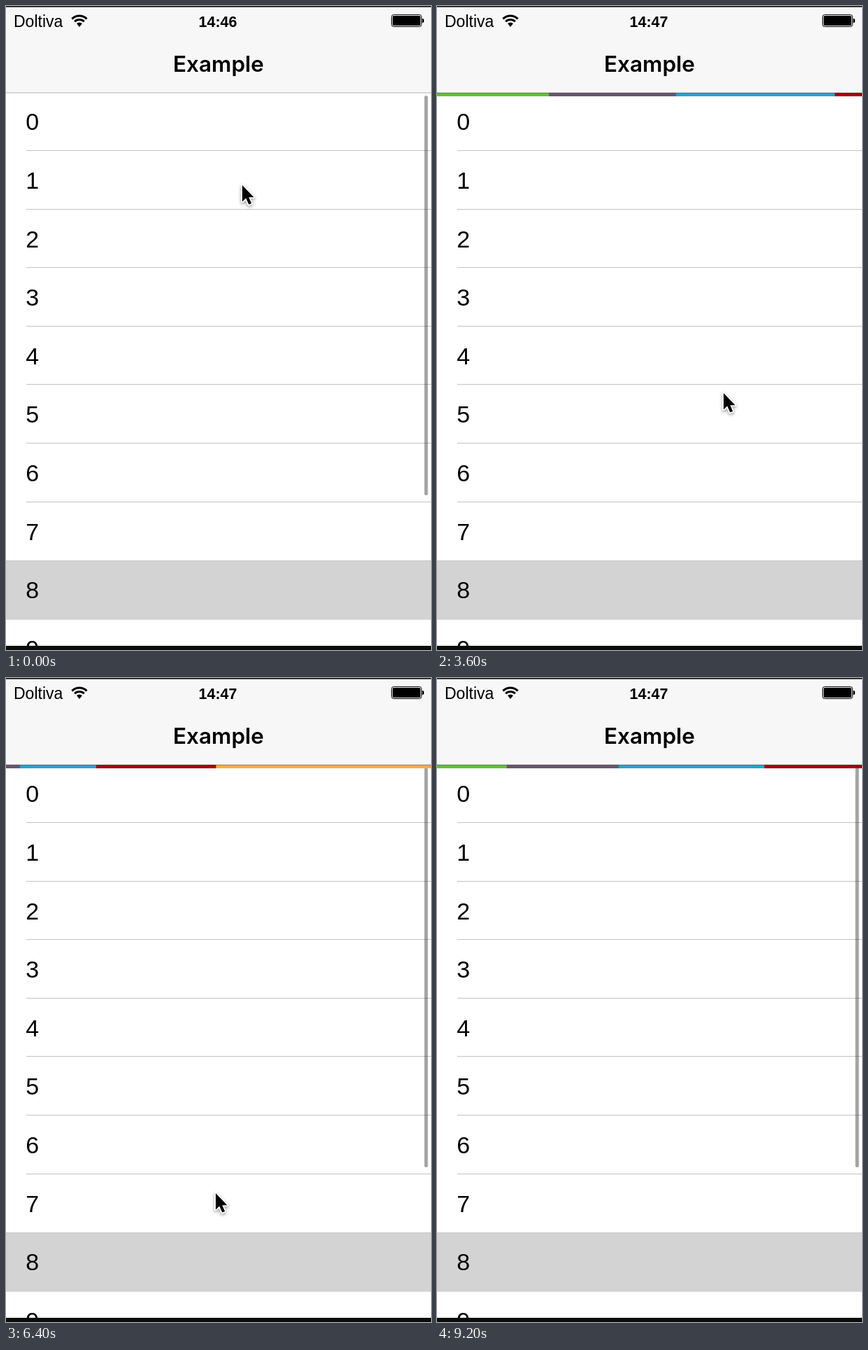
These frames come from a looping animation (608 px wide and 920 px high, 9300 ms). An HTML page with a canvas:

```html
<!DOCTYPE html>
<html lang="en">
<head>
<meta charset="utf-8">
<title>Pull to refresh</title>
<style>
  html, body { margin: 0; width: 100%; height: 100%; overflow: hidden; background: #fff; }
  canvas { display: block; width: 608px; height: 920px; }
</style>
</head>
<body>
<canvas id="stage" width="608" height="920"></canvas>
<script>
const ctx = document.getElementById('stage').getContext('2d');
const W = 608, H = 920, LOOP = 9300, STEP = 100;
const ROW_TOP = 123.2, ROW_HEIGHT = 83.65;
const SWEEP = 700, STAGGER = 179, CYCLE = 1240;
const SWEEP_COLORS = ['#a50006', '#25a5c9', '#69566f', '#63c03c'];
const FIRST_COLOR = '#f3b237', PULL_COLOR = '#343337';
const SANS = '"Liberation Sans", Arial, sans-serif';

// Each pull: bar grows, then colours sweep from "run" until "end".
const PULLS = [
  { start: 100, full: 900, run: 1508, end: 4500 },
  { start: 5690, full: 5900, run: 5943, end: LOOP }
];
// Pointer keys: time, x, y.
const POINTER = [
  [100, 338, 256], [1000, 320, 838], [1100, 320, 846], [1400, 313, 872], [1550, 313, 872],
  [2050, 410, 553], [4600, 410, 553], [4900, 375, 470], [5300, 315, 312],
  [5690, 315, 312], [5950, 300, 736]
];
const POINTER_GONE = 6600;

const clamp = (v, lo = 0, hi = 1) => Math.min(hi, Math.max(lo, v));

function rect(x, y, w, h, color) {
  ctx.fillStyle = color;
  ctx.fillRect(x, y, w, h);
}

function roundRect(x, y, w, h, r, color) {
  ctx.fillStyle = color;
  ctx.beginPath();
  ctx.roundRect(x, y, w, h, r);
  ctx.fill();
}

function text(str, x, y, font, align = 'left') {
  ctx.fillStyle = '#000';
  ctx.font = font;
  ctx.textAlign = align;
  ctx.fillText(str, x, y);
}

// cubic-bezier(.42, 0, 1, 1)
function easeIn(x) {
  if (x <= 0 || x >= 1) return clamp(x);
  let lo = 0, hi = 1;
  for (let i = 0; i < 20; i++) {
    const u = (lo + hi) / 2, v = 1 - u;
    if (1.26 * v * v * u + 3 * v * u * u + u * u * u < x) lo = u; else hi = u;
  }
  return 3 * (1 - lo) * lo * lo + lo ** 3;
}

function drawRows() {
  for (let i = 0; i < 10; i++) {
    const top = ROW_TOP + i * ROW_HEIGHT;
    if (i === 8) rect(0, 792, W, 84, '#d3d3d3');
    else if (i < 7) rect(29, Math.round(top + ROW_HEIGHT) - 1, W - 29, 1, '#c3c3c5');
    text(i, 28.3, top + 54, `34px ${SANS}`);
  }
  rect(29, 708, W - 29, 1, '#c3c3c5');
  rect(0, 792, W, 1, '#c8c8c8');
  rect(0, 876, W, 1, '#dedede');
}

function drawWifi() {
  ctx.strokeStyle = ctx.fillStyle = '#000';
  ctx.lineWidth = 3;
  for (const r of [15, 9.6]) {
    ctx.beginPath();
    ctx.arc(105, 29, r, -Math.PI * 0.75, -Math.PI * 0.25);
    ctx.stroke();
  }
  ctx.beginPath();
  ctx.moveTo(105, 30);
  ctx.arc(105, 29, 5.6, -Math.PI * 0.75, -Math.PI * 0.25);
  ctx.fill();
}

function drawBattery() {
  ctx.strokeStyle = '#000';
  ctx.lineWidth = 1;
  ctx.beginPath();
  ctx.roundRect(551.5, 12.5, 43, 17, 3);
  ctx.stroke();
  roundRect(553, 14, 40, 14, 1.5, '#000');
  roundRect(595.5, 18, 2.5, 6, [0, 2, 2, 0], '#000');
}

function drawHeader(t) {
  rect(0, 0, W, 124, '#f7f7f7');
  rect(0, 123.5, W, 1, '#b5b5b6');
  text('Doltiva', 11, 29.5, `23px ${SANS}`);
  text(t < 2600 ? '14:46' : '14:47', 303, 29.5, `bold 21.5px ${SANS}`, 'center');
  text('Example', 304, 93.5, '600 31.5px Inter, sans-serif', 'center');
  drawWifi();
  drawBattery();
}

function drawBar(t) {
  const pull = PULLS.find(p => t >= p.start && t < p.end);
  if (!pull) return;
  if (t < pull.run) {
    const w = W * clamp((t - pull.start) / (pull.full - pull.start));
    rect((W - w) / 2, 124, w, 5, PULL_COLOR);
    return;
  }
  const age = t - pull.run, local = age % CYCLE;
  rect(0, 124, W, 5, age < CYCLE ? FIRST_COLOR : SWEEP_COLORS[3]);
  SWEEP_COLORS.forEach((color, i) =>
    rect(0, 124, W * easeIn((local - i * STAGGER) / SWEEP), 5, color));
  rect(0, 124, W, 1, 'rgba(60,60,60,.35)');
}

function drawScrollbar(t) {
  const alpha = t < 5690 ? clamp((2000 - t) / 300) : 1;
  roundRect(598.5, 128, 5, 571, 2.5, `rgba(0,0,0,${0.36 * alpha})`);
}

function pointerAt(t) {
  const next = POINTER.findIndex(k => k[0] > t);
  if (next === 0) return POINTER[0].slice(1);
  if (next < 0) return POINTER[POINTER.length - 1].slice(1);
  const [t0, x0, y0] = POINTER[next - 1], [t1, x1, y1] = POINTER[next];
  const k = (t - t0) / (t1 - t0);
  return [x0 + (x1 - x0) * k, y0 + (y1 - y0) * k];
}

function drawPointer(t) {
  if (t >= POINTER_GONE) return;
  ctx.save();
  ctx.translate(...pointerAt(t));
  const arrow = new Path2D('M0 0V23.5L5.3 18.6L9.3 27.6L13.2 26L9.3 17.2H16.6Z');
  ctx.lineJoin = 'round';
  ctx.lineWidth = 3.5;
  ctx.strokeStyle = '#fff';
  ctx.shadowColor = 'rgba(0,0,0,.4)';
  ctx.shadowBlur = 4;
  ctx.shadowOffsetY = 2;
  ctx.stroke(arrow);
  ctx.shadowColor = 'transparent';
  ctx.fillStyle = '#000';
  ctx.fill(arrow);
  ctx.restore();
}

function draw(t) {
  rect(0, 0, W, H, '#fff');
  drawRows();
  drawScrollbar(t);
  drawHeader(t);
  drawBar(t);
  drawPointer(t);
  rect(0, 0, W, 1.6, '#111');
  rect(0, 914, W, 6, '#0b0b0b');
}

const begin = performance.now();
function tick() {
  const t = (performance.now() - begin) % LOOP;
  draw(Math.floor(t / STEP) * STEP);
  requestAnimationFrame(tick);
}
tick();
</script>
</body>
</html>
```
